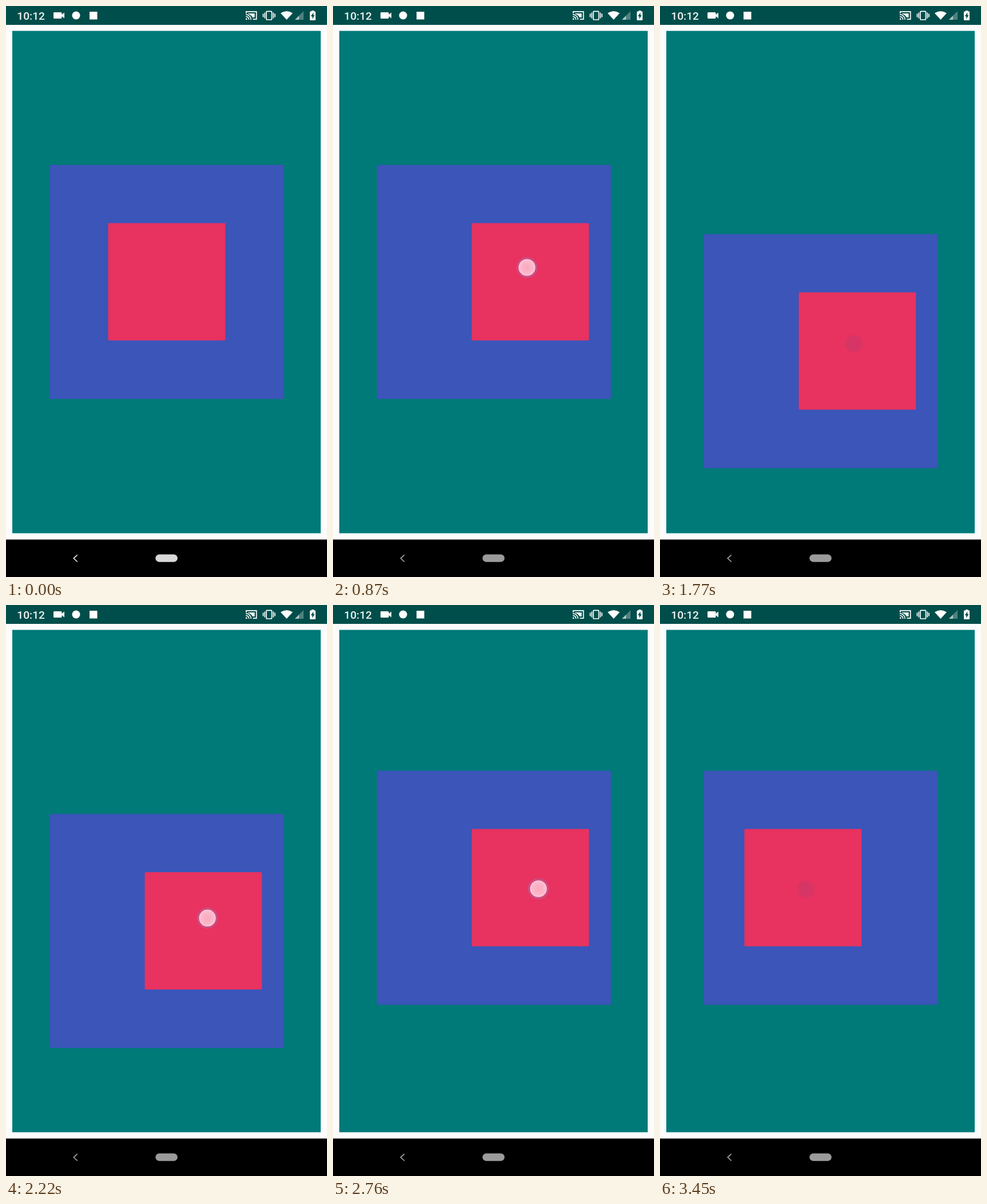
Recreate the animation shown at these times as an HTML page. Size 561 by 998 pixels, loop 3480 ms.

```html
<!DOCTYPE html>
<html lang="en">
<head>
<meta charset="utf-8">
<title>Nested dragging</title>
<style>
  html, body { margin: 0; width: 100%; height: 100%; overflow: hidden; background: #000; }
  svg { display: block; width: 100vw; height: 100vh; }
  text { font: 500 19.2px Roboto, sans-serif; fill: #eff5f5; }
</style>
</head>
<body>
<svg viewBox="0 0 561 998" preserveAspectRatio="none">
  <defs>
    <radialGradient id="glow">
      <stop offset="0" stop-color="#faa9be"/>
      <stop offset=".6" stop-color="#fbb4c8"/>
      <stop offset="1" stop-color="#fcc6d5"/>
    </radialGradient>
  </defs>

  <rect width="561" height="998" fill="#fcfcfc"/>
  <rect x="11" y="43.5" width="539" height="878" fill="#007979"/>

  <g id="outer">
    <rect x="76.8" y="277.8" width="409" height="409" rx="1.5" fill="#3b55b9"/>
    <g id="inner">
      <rect x="178.5" y="379.5" width="204.8" height="205" rx="1.5" fill="#e8325f"/>
    </g>
  </g>

  <circle id="ghost" r="15" fill="#3b55b9" opacity=".09"/>
  <g id="dot">
    <circle r="16.6" fill="none" stroke="#a95c9c" stroke-width="3" opacity=".55"/>
    <circle r="17.4" fill="none" stroke="#d58abb" stroke-width="1" stroke-dasharray="1 1.2" opacity=".7"/>
    <circle r="14.8" fill="url(#glow)"/>
  </g>

  <!-- status bar -->
  <rect width="561" height="33" fill="#004e4b"/>
  <text x="19.3" y="23.8">10:12</text>
  <g fill="#fff">
    <path d="M84 11H96Q97.500 11 97.500 12.500V15L102 11.500V21.500L97.500 18V20.500Q97.500 22 96 22H84.500Q83 22 83 20.500V12.500Q83 11 84 11Z"/>
    <circle cx="122.500" cy="16.500" r="7"/>
    <rect x="146" y="10" width="13.500" height="13.500"/>
    <path d="M480 12.500Q490.500 5.500 501 12.500L490.500 24Z"/>
    <path d="M505 24L520 9V24Z" opacity=".3"/>
    <path d="M505 24L512 17V24Z" opacity=".55"/>
    <path d="M534 9.500V8H538.500V9.500H540Q541 9.500 541 10.500V24Q541 25 540 25H532Q531 25 531 24V10.500Q531 9.500 532 9.500Z"/>
  </g>
  <path d="M537.300 11.500L532.700 18H535.300V22.800L539.500 16H537.300Z" fill="#004e4b"/>
  <g fill="none" stroke="#fff" stroke-width="1.700">
    <path d="M419.800 13V9.800H437.700V23.200H431.500M419 14.800A9.200 9.200 0 0 1 428.200 24M419 18.300A5.700 5.700 0 0 1 424.700 24"/>
    <rect x="455" y="9.300" width="9.500" height="14.700" rx="1"/>
    <path d="M452.300 11.500V21.500M449.500 13.500V19.500M467.300 11.500V21.500M470 13.500V19.500"/>
  </g>
  <path d="M419 21.300A2.700 2.700 0 0 1 421.700 24H419ZM423 13H434.500V20H431Q429 15.500 423 13.800Z" fill="#fff"/>

  <!-- navigation bar -->
  <rect y="932.500" width="561" height="65.500" fill="#000"/>
  <path id="back" d="M124.700 959.300L118.300 965.300L124.700 971.300" fill="none" stroke-width="1.800"/>
  <rect id="pill" x="261.300" y="958.500" width="38.500" height="13.300" rx="6.650"/>
</svg>
<script>
const LOOP = 3480, STEP = 30, SLOP = 12, LAG = 13;

// One finger drag each: press and release times, start and end of the move, path
const drags = [
  { down: 130, from: 210, to: 640, up: 720, x: 263, y: 458, dx: 76, dy: 0 },
  { down: 840, from: 941, to: 1361, up: 1500, x: 339, y: 457, dx: 0, dy: 133 },
  { down: 1960, from: 2028, to: 2458, up: 2520, x: 352, y: 598, dx: 0, dy: -121 },
  { down: 2650, from: 2720, to: 3120, up: 3220, x: 362, y: 496, dx: -107, dy: 1 }
];

const el = id => document.getElementById(id);
const clamp = v => Math.min(1, Math.max(0, v));
const smooth = p => p * p * (3 - 2 * p);
const part = (d, t) => smooth(clamp((t - d.from) / (d.to - d.from)));
const move = (id, x, y) => el(id).setAttribute('transform', `translate(${x.toFixed(2)} ${y.toFixed(2)})`);
const show = (id, on) => el(id).setAttribute('visibility', on ? 'visible' : 'hidden');
const grey = v => `rgb(${v},${v},${v})`;

// A box follows the finger only past the touch slop
const pull = v => Math.sign(v) * Math.max(0, Math.abs(v) - SLOP);

function draw(t) {
  let x = 0, y = 0, pressed = false, last = null;
  for (const d of drags) {
    const p = part(d, t - LAG);
    x += pull(d.dx * p);
    y += pull(d.dy * p);
    if (t >= d.down) {
      last = d;
      pressed = t < d.up;
    }
  }
  move('outer', 0, y);
  move('inner', x, 0);

  if (last) {
    const p = part(last, t);
    for (const id of ['dot', 'ghost']) move(id, last.x + last.dx * p, last.y + last.dy * p);
  }
  show('dot', pressed);
  show('ghost', last && !pressed && t < last.up + 400);

  const dim = clamp((t - 240) / 480);
  el('pill').setAttribute('fill', grey(Math.round(216 - 61 * dim)));
  el('back').setAttribute('stroke', grey(Math.round(214 - 61 * dim)));
}

const start = performance.now();
function tick() {
  const t = (performance.now() - start) % LOOP;
  draw(Math.floor(t / STEP) * STEP);
  requestAnimationFrame(tick);
}
draw(0);
requestAnimationFrame(tick);
</script>
</body>
</html>
```
